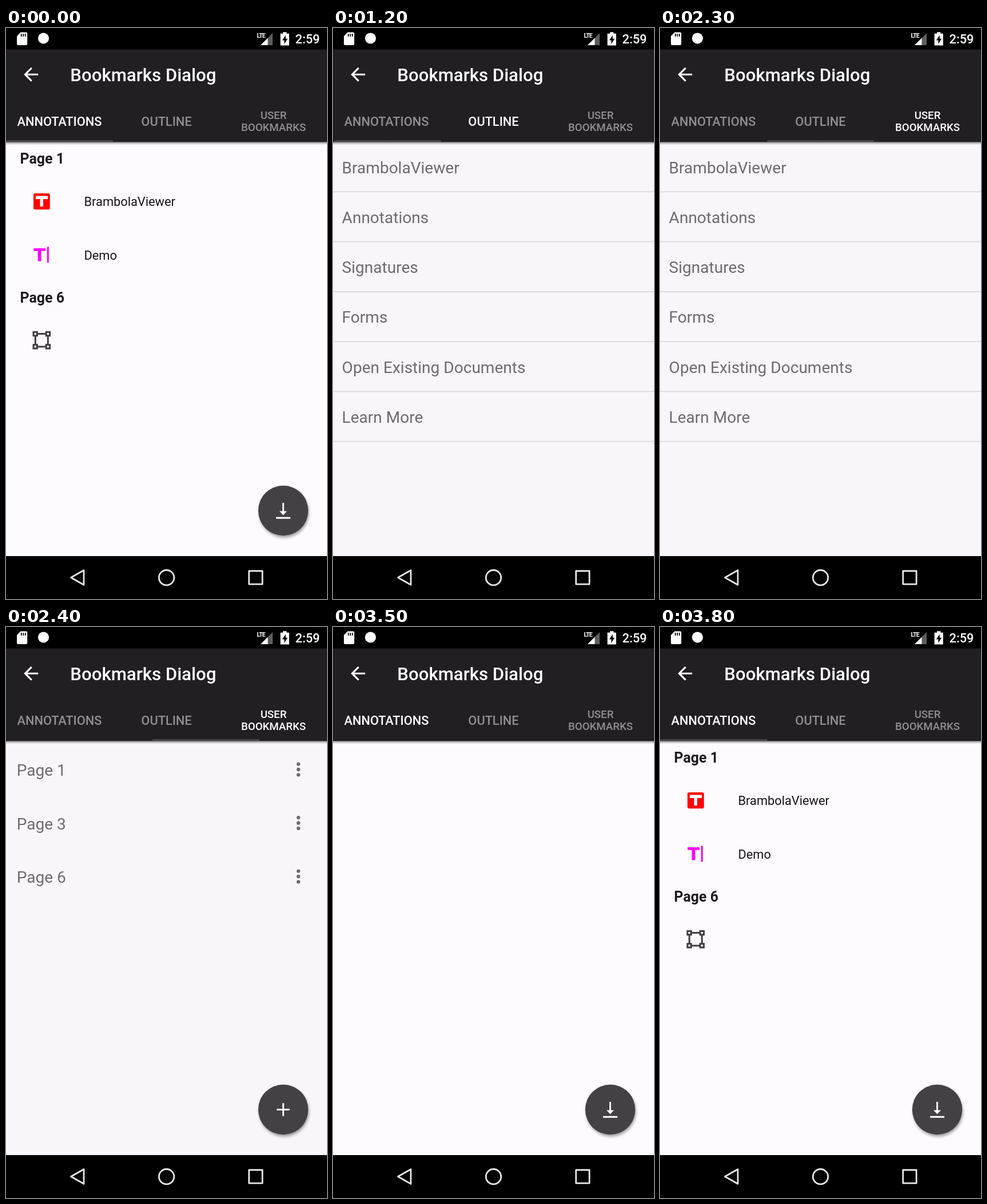
An HTML page that plays this animation: 561 px wide and 998 px high, repeating every 4.4 s.

```html
<!DOCTYPE html>
<html lang="en">
<head>
<meta charset="utf-8">
<title>Bookmarks dialog</title>
<style>
  html, body { margin: 0; width: 100%; height: 100%; overflow: hidden; background: #000; }
  svg { display: block; width: 561px; height: 998px; font-family: Roboto, sans-serif; }
  .tab { font-weight: 500; font-size: 21.8px; text-anchor: middle; fill: #908e91; }
  .tab.small { font-size: 18.7px; }
  .tab.on { fill: #fff; }
  .head { font-weight: 700; font-size: 24.9px; fill: #1d1b1f; }
  .item { font-size: 21.8px; fill: #151317; }
  .row { font-size: 28.05px; fill: #6e6c70; }
</style>
</head>
<body>
<svg viewBox="0 0 561 998">
  <defs>
    <linearGradient id="edge" x2="0" y2="1">
      <stop stop-color="#000" stop-opacity=".42"/>
      <stop offset="1" stop-color="#000" stop-opacity="0"/>
    </linearGradient>
    <filter id="blur" x="-20%" y="-20%" width="140%" height="140%"><feGaussianBlur stdDeviation="2.6"/></filter>
    <g id="fab">
      <circle cx="486" cy="847" r="43.5" opacity=".38" filter="url(#blur)"/>
      <circle cx="484.5" cy="843.5" r="43.7" fill="#434144"/>
    </g>
    <rect id="handle" width="6.4" height="6.4" fill="#fdfbfe"/>
  </defs>

  <rect id="paper" y="199" width="561" height="724"/>

  <g class="page">
    <g id="annotations">
      <text class="head" x="24.5" y="237">Page 1</text>
      <rect x="48" y="289" width="28.8" height="28.2" rx="3" fill="#f00"/>
      <path d="M52 293.5h21v5.6h-8v13h-5.4v-13H52z" fill="#fff"/>
      <text class="item" x="136.5" y="311">BrambolaViewer</text>
      <path d="M48.3 385h20.7v4.8h-7.6v17.6h-5.7v-17.6h-7.4zM71.8 382.6h3v27.6h-3z" fill="#f0f"/>
      <text class="item" x="136.5" y="404.5">Demo</text>
      <text class="head" x="24.5" y="480">Page 6</text>
      <g stroke="#403e41" stroke-width="3">
        <path d="M51.3 534.5h22v22.6h-22z" fill="none"/>
        <use href="#handle" x="48" y="531.4"/>
        <use href="#handle" x="70.2" y="531.4"/>
        <use href="#handle" x="48" y="553.7"/>
        <use href="#handle" x="70.2" y="553.7"/>
      </g>
    </g>
    <use href="#fab"/>
    <path d="M483 830h3v14.6h5l-6.5 7-6.5-7h5zM472 854.7h25v3h-25z" fill="#fff"/>
  </g>
  <g class="page" id="outline"></g>
  <g class="page">
    <g id="bookmarks"></g>
    <use href="#fab"/>
    <path d="M473.3 843.5h22.4M484.5 832.3v22.4" stroke="#fff" stroke-width="3"/>
  </g>

  <rect y="199" width="561" height="5.5" fill="url(#edge)"/>
  <rect y="37" width="561" height="162.3" fill="#211f22"/>
  <rect width="561" height="37.5"/>
  <rect y="923" width="561" height="75"/>

  <g fill="#fff">
    <path d="M25.5 7.5H35.2q2 0 2 2V28q0 2-2 2H21q-2 0-2-2V14.2z"/>
    <path d="M26.8 10v5M30.3 10v5M33.8 10v5" stroke="#000" stroke-width="1.7"/>
    <circle cx="65.5" cy="18" r="9.6"/>
    <path d="M445 30L466 9V30z" fill="#5e5e5e"/>
    <path d="M445 30L457.5 17.5V30z"/>
    <path d="M437 6h17.5v12H437z" fill="#000"/>
    <text x="438.5" y="16.5" font-size="10.5" font-weight="700" letter-spacing="-.9">LTE</text>
    <path d="M484 9.7V7.3h6.4v2.4h4.4V30.5h-15.2V9.7z"/>
    <path d="M488.8 12.5l-6 9h3.6v6.3l5.8-9h-3.4z" fill="#000"/>
    <text x="505.5" y="27.3" font-size="21.8" font-weight="500">2:59</text>
    <path transform="translate(25 62.6) scale(1.558)" d="M20 11H7.83l5.59-5.59L12 4l-8 8 8 8 1.41-1.41L7.83 13H20z"/>
    <text x="112.3" y="93" font-size="31.17" font-weight="500">Bookmarks Dialog</text>
  </g>

  <g class="tab"><text x="93.5" y="170.6">ANNOTATIONS</text></g>
  <g class="tab"><text x="280.5" y="170.6">OUTLINE</text></g>
  <g class="tab small"><text x="467.5" y="158.6">USER</text><text x="467.5" y="180">BOOKMARKS</text></g>
  <rect id="indicator" y="196.2" height="3.1" fill="#4b494d"/>

  <g fill="none" stroke="#e8e8e8" stroke-width="2.8" stroke-linejoin="round">
    <path d="M113.5 960.5L136 947.7v25.6z"/>
    <circle cx="280.5" cy="960.7" r="13.2"/>
    <path d="M424.7 949h23.4v23.2h-23.4z"/>
  </g>
</svg>
<script>
const LOOP = 4400, STEP = 100, SLIDE = 300, TAB = 187;
const $ = id => document.getElementById(id);
const tabs = document.querySelectorAll('.tab');
const pages = document.querySelectorAll('.page');

const outline = ['BrambolaViewer', 'Annotations', 'Signatures', 'Forms', 'Open Existing Documents', 'Learn More'];
$('outline').innerHTML = outline.map((label, i) => {
  const y = 199 + i * 87.27;
  return `<text class="row" x="15.6" y="${y + 54.5}">${label}</text>
    <rect y="${y + 86.5}" width="561" height="1.6" fill="#d8d6da"/>`;
}).join('');

$('bookmarks').innerHTML = [1, 3, 6].map((page, i) => {
  const y = 249 + i * 93.5;
  const dots = [-9.4, 0, 9.4].map(d => `<circle cx="511" cy="${y + d}" r="3.2" fill="#6e6c70"/>`).join('');
  return `<text class="row" x="18.7" y="${y + 11}">Page ${page}</text>${dots}`;
}).join('');

// cubic-bezier(.4, 0, .2, 1)
function ease(x) {
  if (x <= 0 || x >= 1) return x <= 0 ? 0 : 1;
  let lo = 0, hi = 1, s;
  for (let i = 0; i < 24; i++) {
    s = (lo + hi) / 2;
    if (3 * s * (1 - s) * (.4 * (1 - s) + .2 * s) + s ** 3 < x) lo = s; else hi = s;
  }
  return s * s * (3 - 2 * s);
}

function render(time) {
  const t = Math.floor(time % LOOP / STEP) * STEP;
  const slide = start => ease((t - start) / SLIDE);
  const tab = t < 1200 || t >= 3500 ? 0 : t < 2300 ? 1 : 2;
  const page = t >= 2300 && t < 2400 ? 1 : tab;

  tabs.forEach((el, i) => el.classList.toggle('on', i === tab));
  pages.forEach((el, i) => el.style.display = i === page ? '' : 'none');
  $('annotations').style.display = t >= 3500 && t < 3600 ? 'none' : '';
  $('paper').setAttribute('fill', page ? '#f8f6fa' : '#fdfbfe');

  let left = TAB * (slide(1180) + slide(2310)), width = TAB;
  if (t >= 3500) {
    // A jump over two tabs grows the bar from a point beside its goal.
    const p = slide(3500);
    left = (TAB + 37.4) * (1 - p);
    width = TAB * p;
  }
  $('indicator').setAttribute('x', left);
  $('indicator').setAttribute('width', width);
}

const begin = performance.now();
(function tick() {
  render(performance.now() - begin);
  requestAnimationFrame(tick);
})();
</script>
</body>
</html>
```
